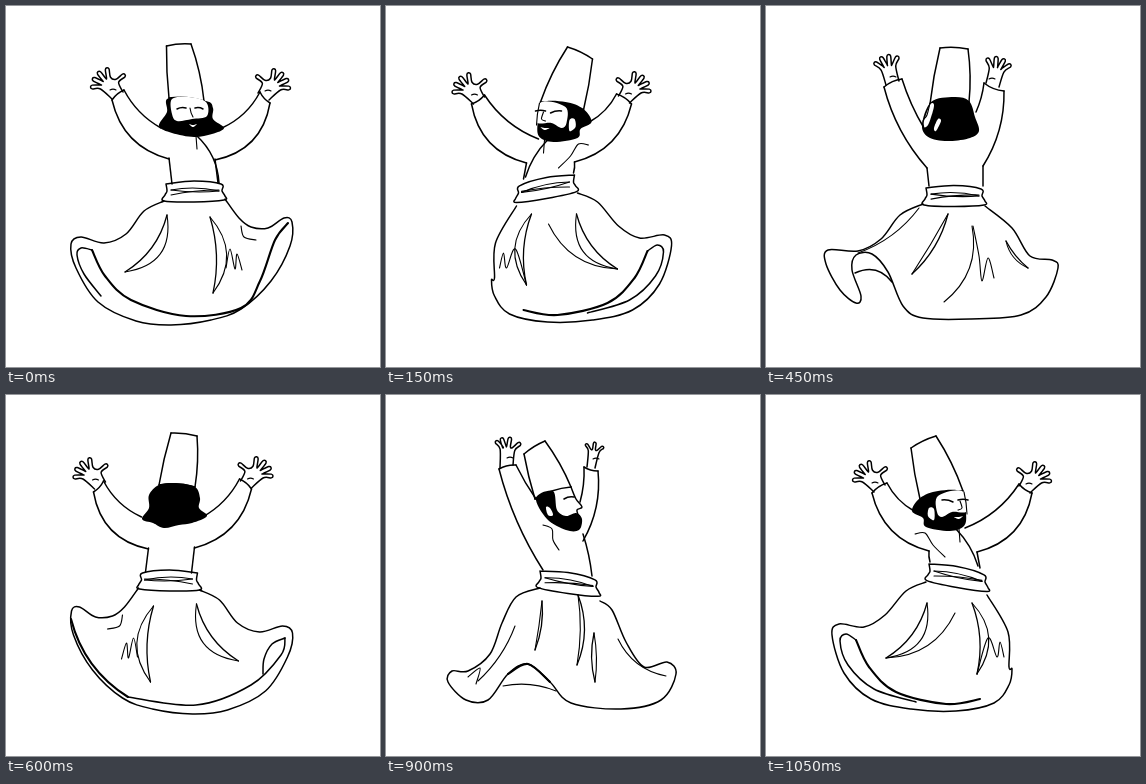
Write an HTML page with a canvas that moves like this. It is 374 by 361 pixels and loops after 1.2 s.

```html
<!DOCTYPE html>
<html lang="en">
<head>
<meta charset="utf-8">
<title>Whirling dancer</title>
<style>
html, body { margin: 0; width: 100%; height: 100%; overflow: hidden; background: #fff; }
canvas { display: block; width: 374px; height: 361px; }
</style>
</head>
<body>
<canvas id="stage"></canvas>
<script>
const W = 374, H = 361, STEP = 150, MIRROR = 351.5;
const THIN = 1.1, MAIN = 1.5, BOLD = 2.1;
const canvas = document.getElementById('stage');
const ctx = canvas.getContext('2d');
const scale = Math.max(1, window.devicePixelRatio || 1);
canvas.width = W * scale;
canvas.height = H * scale;

const parse = text => text.split(' ').map(s => s.split(',').map(Number));

// Smooth curve through key points.
function trace(p, closed) {
  const n = p.length;
  const at = i => closed ? p[(i + n) % n] : p[Math.max(0, Math.min(n - 1, i))];
  ctx.beginPath();
  ctx.moveTo(...p[0]);
  for (let i = 0; i < (closed ? n : n - 1); i++) {
    const [a, b, c, d] = [at(i - 1), at(i), at(i + 1), at(i + 2)];
    ctx.bezierCurveTo(
      b[0] + (c[0] - a[0]) / 6, b[1] + (c[1] - a[1]) / 6,
      c[0] - (d[0] - b[0]) / 6, c[1] - (d[1] - b[1]) / 6, c[0], c[1]);
  }
}

function stroke(points, width = MAIN) {
  trace(points, false);
  ctx.lineWidth = width;
  ctx.stroke();
}

const line = (text, width) => stroke(parse(text), width);

function blob(color, text) {
  trace(parse(text), true);
  ctx.fillStyle = color;
  ctx.fill();
}

// Bowed line; a positive bend bulges to the right of the direction of travel.
function arc(x1, y1, x2, y2, bend = 0, width = MAIN) {
  ctx.beginPath();
  ctx.moveTo(x1, y1);
  ctx.quadraticCurveTo((x1 + x2) / 2 + (y1 - y2) * bend, (y1 + y2) / 2 + (x2 - x1) * bend, x2, y2);
  ctx.lineWidth = width;
  ctx.stroke();
}

function fold(x1, y1, x2, y2, near, far) {
  arc(x1, y1, x2, y2, near, 1.3);
  arc(x1, y1, x2, y2, far, THIN);
}

function mirrored(draw, axis = MIRROR) {
  ctx.save();
  ctx.translate(axis, 0);
  ctx.scale(-1, 1);
  draw();
  ctx.restore();
}

// Fingers fan out from the palm centre; the outline ends at both sides of the wrist.
function hand(x, y, size, angles, wristA, wristB) {
  const points = [[x + wristA[0], y + wristA[1]]];
  for (const angle of angles) {
    for (const [turn, reach] of [[-12, 0.5], [-6, 0.92], [0, 1], [6, 0.92], [12, 0.5]]) {
      const a = (angle + turn) * Math.PI / 180;
      points.push([x + Math.cos(a) * size * reach, y + Math.sin(a) * size * reach]);
    }
  }
  points.push([x + wristB[0], y + wristB[1]]);
  stroke(points);
  arc(x, y + 3, x + 6, y + 3, -0.3, THIN);
}

const openHand = (x, y) => hand(x, y, 19.5, [180, 206, 232, 261, 320], [2, 12], [13, 5]);
const raisedHand = (x, y) => hand(x, y, 19.5, [216, 241, 266, 294], [-4, 11], [9, 7]);

function sleeve(inner, outer, shoulder, armpit, bend) {
  arc(...inner, ...shoulder, bend / 2);
  arc(...outer, ...armpit, bend);
  arc(...inner, ...outer, 0.15);
}

function hat(topLeft, topRight, left, right) {
  arc(...topLeft, ...topRight, -0.08);
  arc(...topLeft, ...left, 0.03);
  arc(...topRight, ...right, -0.06);
  arc(...left, ...right, -0.12);
}

function belt(x, y, drop) {
  const slant = ([px, py]) => [x + px, y + py + drop * px / 56];
  const edge = '0,0 28,-3 55,0 56,7 59,12 58,16 28,18 -2,17 -1,11 1,7 0,0';
  stroke(parse(edge).map(slant));
  for (const bend of [-0.1, 0.06]) arc(...slant([5, 6]), ...slant([53, 7]), bend, THIN);
  arc(...slant([5, 11]), ...slant([53, 6]), -0.05, THIN);
}

function wideBody() {
  openHand(104, 81);
  mirrored(() => openHand(104, 82), 369);
  sleeve([118, 84], [106, 94], [155, 122], [163, 153], 0.3);
  sleeve([254, 86], [264, 97], [216, 122], [209, 154], -0.34);
  arc(163, 152, 166, 178);
  arc(209, 153, 212, 177);
  belt(160, 178, 0);
  line('158,195 138,205 120,228 98,237 75,231 65,238 70,262 92,296 130,315 165,319 205,314 235,303 265,275 284,240 286,216 278,212 262,222 245,221 233,212 219,193');
  fold(161, 209, 119, 266, -0.2, -0.5);
  fold(204, 211, 207, 287, -0.13, -0.4);
  line('220,262 224,243 229,263 231,248 236,264', THIN);
  line('235,220 238,231 250,234', THIN);
}

function front() {
  wideBody();
  hat([160.5, 40], [185, 38], [163, 92], [198, 95]);
  arc(191, 130, 213, 177, -0.2);
  arc(190, 130, 191, 143, 0, THIN);
  blob('#000', '163,92 161,106 153,120 166,127 188,131 206,128 218,122 207,113 207,102 200,95');
  blob('#fff', '166,93 183,91 200,96 201,110 186,113 171,115 166,108');
  blob('#fff', '183,118 187,119 191,118 187,121');
  arc(171, 103, 180, 102, -0.2);
  arc(189, 102, 197, 103, -0.2);
  arc(184, 102, 187, 111, 0.1, THIN);
  line('95,290 78,268 71,249 75,242 86,244', MAIN);
  line('86,244 99,270 125,294 180,310 235,302 254,275 269,234 282,217', BOLD);
}

function back() {
  mirrored(wideBody);
  hat([165, 38], [191, 41], [153, 90], [189, 92]);
  blob('#000', '153,90 170,88 189,92 194,103 193,113 201,121 186,128 173,130 158,133 147,128 136,124 143,113 143,100');
  line('257,279 258,264 266,249 279,243');
  line('279,243 275,260 245,290 190,310 122,302');
  arc(65, 224, 122, 302, 0.2, BOLD);
}

function turned() {
  openHand(106, 85);
  mirrored(() => openHand(104, 86), 370);
  sleeve([121, 88], [106, 98], [148, 116], [163, 156], 0.3);
  sleeve([253, 89], [266, 98], [199, 133], [211, 157], -0.32);
  arc(163, 156, 164, 167, 0.1);
  arc(211, 157, 214, 173);
  arc(190, 134, 212, 171, -0.12);
  arc(193, 134, 194, 147, 0, THIN);
  line('149,139 159,138 167,150 179,162', THIN);
  hat([145, 53], [170, 41], [154, 104], [197, 96]);
  blob('#000', '154,103 172,96 196,97 200,118 198,131 184,136 160,132 157,123 146,116');
  blob('#fff', '172,101 196,96 201,116 186,117 176,122 171,117');
  blob('#fff', '163,113 168,114 168,125 162,121');
  blob('#fff', '188,122 193,122 197,121 193,124');
  arc(176, 105, 187, 107, -0.15);
  arc(192, 105, 202, 105, -0.15);
  line('194,106 196,113 192,115', THIN);
  arc(198, 97, 201, 119, -0.05, THIN);
  belt(163, 169, 11);
  line('160,187 140,196 119,220 98,232 73,229 66,240 78,278 105,304 145,314 190,316 228,308 243,290 246,274 243,272 242,237 221,200');
  line('150,307 108,294 82,270 74,246 80,239 90,245');
  line('90,245 103,272 130,297 180,309 214,304', BOLD);
  fold(161, 208, 120, 263, -0.2, -0.5);
  fold(206, 208, 211, 279, -0.15, -0.4);
  arc(120, 263, 189, 218, 0.3, THIN);
  line('211,279 222,243 231,262 234,247 238,262', THIN);
}

function raisedBack() {
  raisedHand(124, 68);
  mirrored(() => raisedHand(124, 70), 353);
  sleeve([136, 73], [118, 81], [158, 122], [161, 162], 0.12);
  sleeve([218, 77], [238, 85], [210, 106], [217, 160], -0.15);
  arc(161, 162, 163, 180);
  arc(217, 160, 217, 180);
  hat([174, 42], [202, 43], [164, 98], [203, 96]);
  blob('#000', '165,96 188,91 203,95 209,111 213,125 204,132 184,135 164,132 156,120');
  blob('#fff', '164,99 168,100 162,119 157,119');
  blob('#fff', '172,113 175,115 170,125 168,122');
  line('164,97 161,109 157,115 158,123', THIN);
  belt(160, 182, 1);
  line('157,198 134,209 115,233 92,245 62,244 60,258 74,284 90,297 95,290 86,264 90,249 106,248 122,266 137,300 157,312 205,313 255,309 280,291 292,262 286,254 264,250 246,222 219,200');
  arc(89, 267, 126, 276, -0.4);
  arc(92, 247, 153, 202, 0.15, THIN);
  fold(182, 208, 146, 268, -0.15, -0.02);
  arc(206, 220, 178, 296, -0.3, THIN);
  line('207,220 213,250 216,275 222,252 228,272', THIN);
  fold(240, 235, 262, 262, 0.1, 0.25);
}

function raisedSide() {
  hand(121, 60, 18, [232, 252, 280, 318], [-7, 13], [6, 10]);
  hand(207, 61, 14, [240, 278, 318], [-6, 11], [2, 12]);
  sleeve([130, 70], [113, 74], [150, 104], [157, 175], 0.08);
  sleeve([198, 72], [212, 76], [194, 107], [197, 146], -0.16);
  arc(197, 139, 206, 181, -0.05);
  line('157,130 166,134 167,145 173,155', THIN);
  hat([138, 59], [159, 46], [149, 104], [185, 92]);
  line('185,92 190,104 196,112 191,115 193,122');
  blob('#000', '150,103 167,96 171,115 180,121 190,118 196,124 193,135 180,135 161,124');
  blob('#fff', '160,112 164,113 167,120 162,120');
  arc(178, 104, 188, 102, -0.2);
  belt(154, 176, 9);
  line('154,193 130,202 116,228 104,259 82,276 66,276 62,287 80,305 102,305 122,279 142,269 164,287 185,308 235,314 275,305 290,279 281,267 258,272 240,247 226,215 214,206');
  line('122,279 142,269 164,287', BOLD);
  arc(117, 291, 170, 296, -0.15, THIN);
  fold(156, 206, 149, 255, -0.12, -0.02);
  arc(129, 231, 92, 286, -0.12, THIN);
  line('82,282 94,273 90,289', THIN);
  fold(192, 200, 191, 270, -0.2, -0.08);
  fold(208, 238, 209, 287, 0.12, -0.08);
  arc(232, 244, 280, 281, 0.25, THIN);
}

const poses = [
  front,
  () => mirrored(turned),
  () => mirrored(raisedSide),
  raisedBack,
  back,
  () => mirrored(raisedBack),
  raisedSide,
  turned
];

const start = performance.now();

function frame() {
  const t = performance.now() - start;
  ctx.setTransform(scale, 0, 0, scale, 0, 0);
  ctx.fillStyle = '#fff';
  ctx.fillRect(0, 0, W, H);
  ctx.strokeStyle = '#000';
  ctx.lineCap = ctx.lineJoin = 'round';
  poses[Math.floor(t / STEP) % poses.length]();
  requestAnimationFrame(frame);
}
frame();
</script>
</body>
</html>
```
